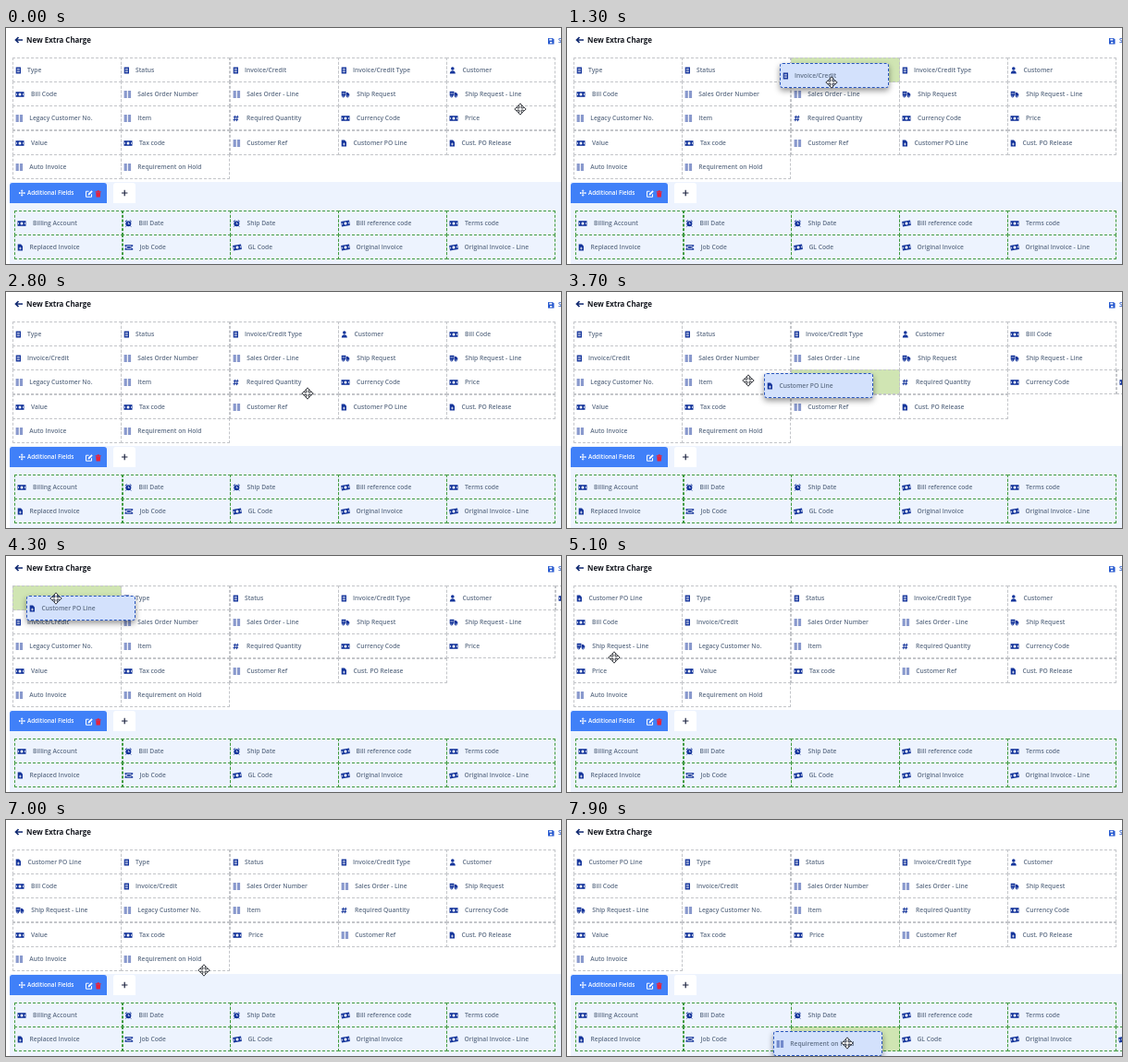
An HTML page for the animation above (8000 ms loop, 600 by 256 pixels).

```html
<!DOCTYPE html>
<html lang="en">
<head>
<meta charset="utf-8">
<title>Extra charge layout</title>
<style>
html, body { margin: 0; width: 100%; height: 100%; overflow: hidden; background: #fff; }
#stage {
  position: relative; width: 600px; height: 256px; overflow: hidden; background: #fff;
  font: 600 6.7px/10px "Open Sans", "Noto Sans", sans-serif; color: #5f6f86; white-space: nowrap;
}
#stage > * { position: absolute; }
svg { display: block; overflow: visible; }
.panel { left: 4px; top: 167px; width: 596px; height: 89px; background: #edf3fe; }
.title { left: 22px; top: 8px; font-size: 7.9px; font-weight: 700; color: #14171f; }
.save { left: 597px; top: 9px; color: #2d5cc8; }
.tab { left: 4px; top: 168px; width: 105px; height: 22px; border-radius: 3px 3px 0 0; background: #4080f8; }
.tab span { position: absolute; left: 19px; top: 6px; color: #fff; font-size: 6.3px; }
.plus { left: 116px; top: 168px; width: 24px; height: 22px; border-radius: 3px 3px 0 0; background: #fff; }
.art { left: 0; top: 0; z-index: 1; }
.cell {
  left: 0; top: 0; width: 118px; height: 27px; box-sizing: border-box;
  border: 1px dashed #c3c5c9;
}
.cell svg { position: absolute; left: 1.5px; top: 7.5px; fill: #15359b; stroke: #15359b; stroke-width: 0; }
.cell span { position: absolute; top: 7.6px; }
.low { border-color: #3f9a3f; }
.hold { background: #d0e5b3; }
.drag {
  z-index: 3; border: 1px dashed #2855bd; border-radius: 3px; background: #d3e1fc;
  box-shadow: 0 3px 6px rgba(0, 0, 0, .42);
}
#cursor { left: 0; top: 0; z-index: 4; }
</style>
</head>
<body>
<div id="stage">
  <div class="panel"></div>
  <div class="title">New Extra Charge</div>
  <div class="save">Save</div>
  <div class="tab"><span>Additional Fields</span></div>
  <div class="plus"></div>
  <svg class="art" width="600" height="256" fill="none">
    <path d="M18 13h-7M13.5 10l-3 3 3 3" stroke="#122a72" stroke-width="1.7"/>
    <path d="M586 11h5l1.5 1.5V17.5H586z" fill="#2457cf"/>
    <path d="M587.3 11.8h3v1.6h-3zM588 15h2.4v1.6H588z" fill="#fff"/>
    <path d="M14 179h6.400M17.200 175.800v6.400M15 178l-1 1 1 1M19.400 178l1 1-1 1M16.200 176.800l1-1 1 1M16.200 181.200l1 1 1-1" stroke="#fff" stroke-width=".9"/>
    <path d="M89.500 177.200h-3v6h6v-3" stroke="#fff"/>
    <path d="M88.500 181.500l.4-1.700 3.500-3.500 1.300 1.300-3.500 3.500z" fill="#fff"/>
    <path d="M96.700 177.200h6v1h-6zM98.600 176.300h2.200v1h-2.200zM97.200 178.600h5l-.4 5h-4.200z" fill="#e5233d"/>
    <path d="M125 179h6.400M128.200 175.800v6.400" stroke="#1c2340" stroke-width="1.200"/>
  </svg>
  <svg id="cursor" width="1" height="1">
    <path d="M0-6.200L2.600-3.300H1.100V-1.100H3.300V-2.600L6.200 0 3.300 2.600V1.100H1.100V3.300H2.600L0 6.200-2.600 3.300H-1.100V1.100H-3.300V2.600L-6.200 0-3.300-2.600V-1.100H-1.100V-3.300H-2.600Z"
      fill="#fff" stroke="#22252c" stroke-width=".9"/>
  </svg>
</div>
<script>
const stage = document.getElementById("stage");
const cursor = document.getElementById("cursor");

const white = d => `<path d="${d}" fill="none" stroke="#fff" stroke-width=".7"/>`;
const lines = (d, w) => `<path d="${d}" fill="none" stroke-width="${w}"/>`;
const note = `<path d="M.5 2.200h9v5.600h-9z"/><circle cx="5" cy="5" r="1.500" fill="#fff"/>` + white("M1.500 4v2M8.500 4v2");

// Each icon: drawing, then the left edge of its label
const icons = {
  doc: [`<path d="M.7 1.500h5.300v7H.7z"/>` + white("M1.800 3.400h3.100M1.800 5h3.100M1.800 6.600h3.100"), 15],
  file: [`<path d="M.7 1.500h3.300l2 2v5H.7z"/>` + white("M2 6h2.800M3.400 4.600v2.800"), 15.500],
  note: [note, 19],
  tilt: [`<g transform="rotate(-9 5 5)">${note}</g>`, 18.500],
  list: [lines("M.6 2h3.200M.6 4h3.200M.6 6h3.200M.6 8h3.200M4.900 2h3.200M4.900 4h3.200M4.900 6h3.200M4.900 8h3.200", 1.100), 17.300],
  hash: [lines("M2.800 1.800L1.800 8.200M5.300 1.800L4.300 8.200M.8 3.700h5.600M.5 6.300h5.600", 1), 17],
  ship: [`<path d="M.7 1.800h4.800v4.800H.7zM6 3h1.700l1.600 1.700v1.900H6z"/><circle cx="2.700" cy="7" r="1.400"/><circle cx="7.300" cy="7" r="1.400"/><circle cx="2.700" cy="7" r=".5" fill="#fff"/><circle cx="7.300" cy="7" r=".5" fill="#fff"/>` + white("M1.500 4h3"), 19.300],
  user: [`<circle cx="3.800" cy="3" r="1.800"/><path d="M.8 8.500c0-4.400 6-4.400 6 0z"/>`, 16.500],
  clock: [`<circle cx="4.300" cy="5.300" r="3"/>` + lines("M.9 3L2.700 1.500M5.900 1.500L7.700 3M2.300 7.400l-.9 1.100M6.300 7.400l.9 1.100", 1) + white("M4.300 3.600v1.900h1.400"), 17.500],
  ticket: [`<path d="M.5 2.200h8.700v1.600a1.200 1.200 0 0 0 0 2.400v1.600H.5V6.200a1.200 1.200 0 0 0 0-2.400z"/>` + white("M2.500 3.700h4.700v2.600H2.500z"), 18.500]
};

const fields = `doc Type|doc Status|doc Invoice/Credit|doc Invoice/Credit Type|user Customer
note Bill Code|list Sales Order Number|list Sales Order - Line|ship Ship Request|ship Ship Request - Line
list Legacy Customer No.|list Item|hash Required Quantity|note Currency Code|note Price
note Value|note Tax code|list Customer Ref|file Customer PO Line|file Cust. PO Release
list Auto Invoice|list Requirement on Hold
note Billing Account|clock Bill Date|clock Ship Date|tilt Bill reference code|note Terms code
file Replaced Invoice|ticket Job Code|tilt GL Code|tilt Original Invoice|tilt Original Invoice - Line`
  .split("\n").map(row => row.split("|"));

const svg = name => `<svg width="10" height="10">${icons[name][0]}</svg>`;

function addCell(html) {
  const el = document.createElement("div");
  el.className = "cell";
  el.innerHTML = html;
  stage.append(el);
  return el;
}

const hold = addCell("");
const cells = fields.flat().map(text => {
  const gap = text.indexOf(" "), icon = text.slice(0, gap);
  return addCell(`${svg(icon)}<span style="left:${icons[icon][1]}px">${text.slice(gap + 1)}</span>`);
});
stage.append(cursor);

const INVOICE = 2, PRICE = 14, PO_LINE = 18, ON_HOLD = 21;
const GLIDE = 250, LAG = 100, LOOP = 8000;

// Layout history: where every field sits after each step
let count = 0, rows = fields.map(row => row.map(() => count++));
const steps = [];

function place(r, c) {
  return r < 5
    ? { x: 7 + 117.3 * c, y: 31.500 + 26.350 * r, low: false }
    : { x: 8.500 + 116.9 * c, y: 197.500 + 26.200 * (r - 5), low: true };
}

function record(t, glide) {
  const spots = [];
  rows.forEach((row, r) => row.forEach((id, c) => spots[id] = place(r, c)));
  steps.push({ t, glide, spots });
}

function move(t, id, r, c, glide = false) {
  rows = rows.map(row => row.filter(other => other !== id));
  rows[r].splice(c, 0, id);
  record(t, glide);
}

function reflow(t) {
  const all = rows.slice(0, 5).flat();
  rows = [0, 5, 10, 15, 20].map(i => all.slice(i, i + 5)).concat(rows.slice(5));
  record(t, false);
}

record(0, false);
move(1400, INVOICE, 1, 2);
move(1740, INVOICE, 1, 1, true);
reflow(2300);
move(3550, PO_LINE, 2, 2);
move(3800, PO_LINE, 2, 1, true);
move(3950, PO_LINE, 1, 1);
move(4100, PO_LINE, 1, 0, true);
move(4300, PO_LINE, 0, 0);
reflow(4800);
move(5640, PRICE, 3, 1, true);
move(5862, PRICE, 3, 2, true);
move(7300, ON_HOLD, 5, 2);
move(7500, ON_HOLD, 6, 2);

const drags = [
  { id: INVOICE, from: 1100, to: 2300, dx: 70, dy: 14, lag: LAG },
  { id: PO_LINE, from: 3400, to: 4800, dx: 44, dy: 17, lag: LAG },
  { id: PRICE, from: 5500, to: 6400, dx: 60, dy: 15, lag: LAG },
  { id: ON_HOLD, from: 7100, to: LOOP, dx: 80, dy: 13, lag: 0 }
];

// Pointer path: time, x, y
const path = [
  [0, 556, 88], [200, 500, 74], [600, 335, 49], [800, 312, 46], [1000, 312, 46],
  [1200, 300, 52], [1400, 272, 66], [1700, 232, 72], [1800, 204, 73], [1900, 192, 73],
  [2000, 182, 74], [2300, 182, 74], [2700, 300, 104], [3100, 402, 127], [3200, 404, 128],
  [3300, 404, 128], [3500, 330, 115], [3600, 257, 105], [3700, 196, 96], [3900, 140, 86],
  [4200, 66, 60], [4400, 42, 32], [4800, 42, 32], [5100, 51, 110], [5300, 67, 126],
  [5400, 67, 126], [5700, 150, 129], [5900, 287, 128], [6000, 287, 128], [6200, 292, 128],
  [6300, 292, 128], [6800, 205, 150], [6900, 205, 150], [7000, 214, 163], [7300, 262, 211],
  [7500, 288, 230], [7800, 300, 240], [7900, 303, 242], [LOOP, 303, 242]
];

function pointer(t) {
  const i = Math.max(1, path.findIndex(p => p[0] >= t));
  const [t0, x0, y0] = path[i - 1], [t1, x1, y1] = path[i];
  const k = (t - t0) / (t1 - t0);
  return { x: x0 + (x1 - x0) * k, y: y0 + (y1 - y0) * k };
}

function put(el, x, y) {
  el.style.transform = `translate(${Math.round(x)}px, ${Math.round(y)}px)`;
}

function draw(t) {
  const n = steps.filter(s => s.t <= t).length - 1;
  const step = steps[n], before = steps[Math.max(0, n - 1)];
  const p = step.glide ? Math.min(1, (t - step.t) / GLIDE) : 1;
  const left = (1 - p) ** 2;
  const drag = drags.find(d => t >= d.from && t < d.to);

  cells.forEach((el, id) => {
    const spot = step.spots[id], old = before.spots[id];
    const held = drag && drag.id === id;
    el.className = "cell" + (held ? " drag" : spot.low ? " low" : "");
    if (held) {
      const at = pointer(t - drag.lag);
      put(el, at.x - drag.dx, at.y - drag.dy);
    } else {
      put(el, spot.x + (old.x - spot.x) * left, spot.y + (old.y - spot.y) * left);
    }
  });

  hold.style.display = drag ? "" : "none";
  if (drag) {
    const spot = step.spots[drag.id];
    hold.className = "cell hold" + (spot.low ? " low" : "");
    hold.innerHTML = drag.id === INVOICE ? svg("doc") : "";
    put(hold, spot.x, spot.y);
  }

  const at = pointer(t);
  put(cursor, at.x, at.y);
}

const start = performance.now();
function tick() {
  const t = (performance.now() - start) % LOOP;
  draw(Math.floor(t / 100) * 100);
  requestAnimationFrame(tick);
}
tick();
</script>
</body>
</html>
```
